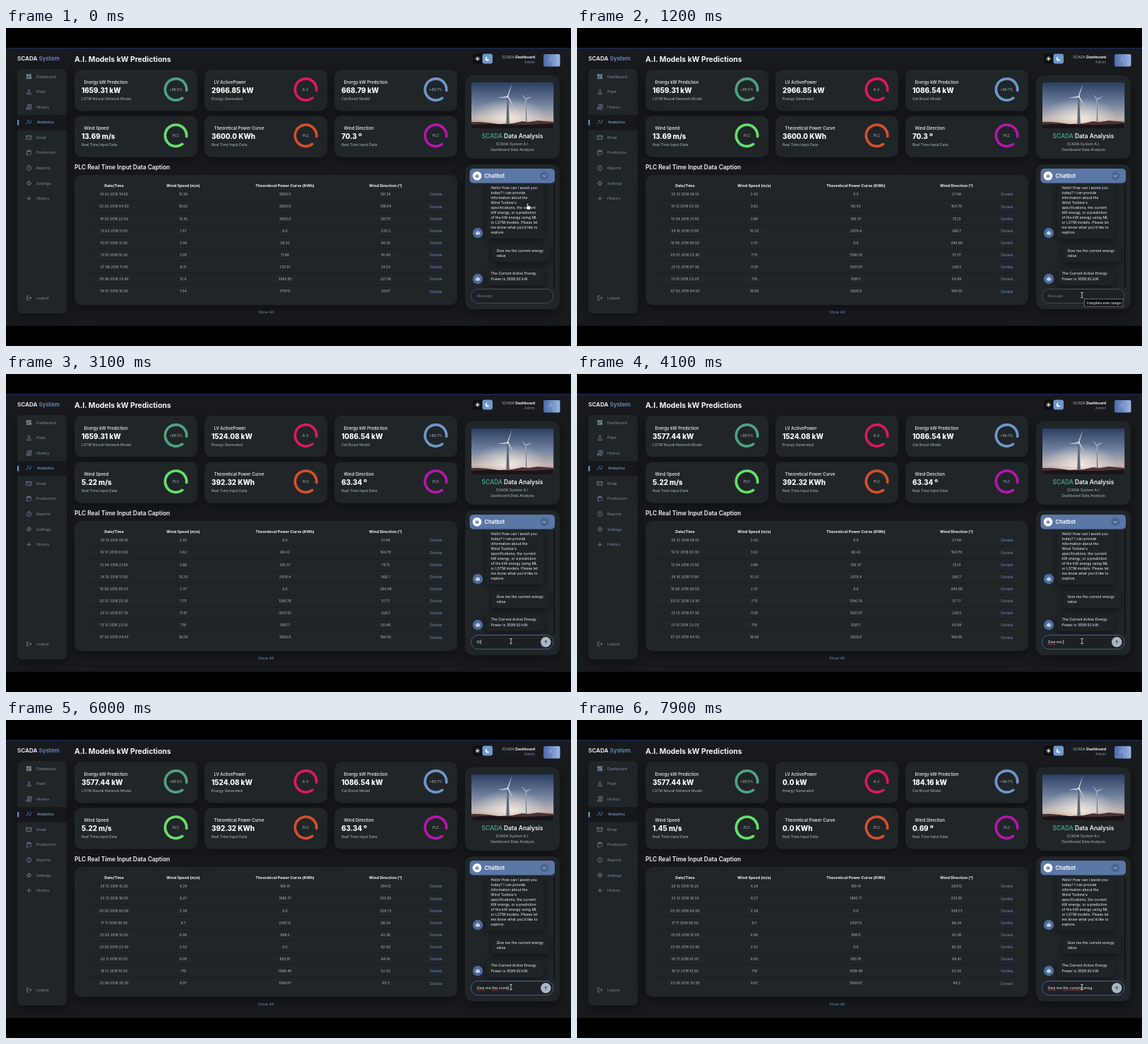
Animation of 800 by 450 pixels, one loop 8000 ms. Source, as an HTML page:

```html
<!DOCTYPE html>
<html lang="en">
<head>
<meta charset="utf-8">
<title>Plant dashboard</title>
<style>
html, body { margin: 0; width: 100%; height: 100%; overflow: hidden; background: #000; }
svg { display: block; width: 800px; height: 450px; }
text { font-family: Inter, "Open Sans", sans-serif; white-space: pre; }
.panel { fill: #202528; filter: drop-shadow(0 6px 8px rgba(0, 0, 0, .4)); }
.bubble { fill: #1e2326; filter: drop-shadow(0 3px 4px rgba(0, 0, 0, .45)); }
</style>
</head>
<body>
<svg id="stage" viewBox="0 0 800 450" xmlns="http://www.w3.org/2000/svg"></svg>
<script>
const LOOP = 8000;
const WHITE = '#f4f5fd', MUTED = '#b0bcc4', GREY = '#7d8da1', BLUE = '#6690c4';
const stage = document.getElementById('stage');

// Markup helpers; text is placed by the middle of its capitals.
const text = (x, mid, str, size, o = {}) =>
  `<text x="${x}" y="${(mid + size * .36).toFixed(2)}" font-size="${size}" font-weight="${o.weight || 400}"` +
  ` fill="${o.fill || MUTED}" text-anchor="${o.anchor || 'start'}"${o.id ? ` id="${o.id}"` : ''}>${str}</text>`;
const rect = (x, y, x2, y2, r, attrs) =>
  `<rect x="${x}" y="${y}" width="${x2 - x}" height="${y2 - y}" rx="${r}" ${attrs}/>`;
const circle = (x, y, r, attrs) => `<circle cx="${x}" cy="${y}" r="${r}" ${attrs}/>`;
const path = (d, attrs) => `<path d="${d}" ${attrs}/>`;
const line = (color, width) =>
  `fill="none" stroke="${color}" stroke-width="${width}" stroke-linecap="round" stroke-linejoin="round"`;
const mid = { anchor: 'middle' };

const MENU = [
  ['Dashboard', 'M4 4h6v8h-6zM4 16h6v4h-6zM14 4h6v4h-6zM14 12h6v8h-6z', true],
  ['Plant', 'M12 4a3.5 3.5 0 1 0 .1 0zM5 20v-2c0-5 14-5 14 0v2z'],
  ['History', 'M7 16V3h14v15a3 3 0 0 1-3 3H5a3 3 0 0 1-3-3v-2h13v3M11 8h6M11 12h6'],
  ['Analytics', 'M2 18l7-7 5 5 8-9M8 4v3M6.5 5.5h3M17 3v2M18 13v1'],
  ['Email', 'M3 5h18v14H3zM3 7l9 6 9-6'],
  ['Production', 'M10 21H4V5h16v6M9 3h6v5H9zM13 17l3 3 6-6'],
  ['Reports', 'M12 3a9 9 0 1 0 .1 0M12 7v6M12 16.5v.5'],
  ['Settings', 'M12 7a5 5 0 1 0 .1 0zM12 3v4M12 17v4M3 12h4M17 12h4M6 6l2 2M18 6l-2 2M6 18l2-2M18 18l-2-2'],
  ['History', 'M12 5v14M5 12h14']
];
const LOGOUT = 'M11 4H4v16h7M9 12h12M17 8l4 4-4 4';

const CARDS = [
  ['Energy kW Prediction', 'LSTM Neural Network Model', '+99.5%', '#4fa183'],
  ['LV ActivePower', 'Energy Generated', 'A.V.', '#dc195d'],
  ['Energy kW Prediction', 'Cat Boost Model', '+98.7%', '#7096c8'],
  ['Wind Speed', 'Real Time Input Data', 'PLC', '#66df6a'],
  ['Theoretical Power Curve', 'Real Time Input Data', 'PLC', '#d3502f'],
  ['Wind Direction', 'Real Time Input Data', 'PLC', '#b617a9']
];
// Card readings as [time, value] steps.
const VALUES = [
  [[0, '1659.31 kW'], [3500, '3577.44 kW']],
  [[0, '2966.85 kW'], [2400, '1524.08 kW'], [7400, '0.0 kW']],
  [[0, '668.79 kW'], [600, '1086.54 kW'], [6600, '184.16 kW']],
  [[0, '13.69 m/s'], [2400, '5.22 m/s'], [7400, '1.45 m/s']],
  [[0, '3600.0 KWh'], [2400, '392.32 KWh'], [7400, '0.0 KWh']],
  [[0, '70.3 º'], [2400, '63.34 º'], [7400, '0.69 º']]
];

const COLUMNS = [[153, 'Date/Time'], [251, 'Wind Speed (m/s)'],
  [395, 'Theoretical Power Curve (KWh)'], [537.5, 'Wind Direction (°)']];
const TABLES = [
  [0, `14 02 2018 14:00|15.38|3600.0|191.34
02 03 2018 04:30|16.02|3600.0|198.94
19 03 2018 22:50|13.35|3600.0|207.17
13 02 2018 11:00|1.57|0.0|235.3
10 07 2018 12:00|3.34|36.32|40.35
31 10 2018 18:20|3.05|17.68|45.49
27 08 2018 11:40|6.31|732.51|24.03
29 06 2018 23:40|12.6|3585.95|221.58
14 07 2018 16:00|7.34|1178.12|29.67`],
  [1100, `30 12 2018 09:10|2.42|0.0|27.49
16 12 2018 03:30|3.62|66.42|164.79
13 04 2018 21:00|3.88|105.37|75.13
24 10 2018 17:00|10.33|2979.4|266.7
10 06 2018 00:50|2.37|0.0|284.99
03 07 2018 23:30|7.75|1390.76|57.77
23 12 2018 07:30|11.91|3507.01|228.5
13 10 2018 23:20|7.16|1091.7|50.49
07 03 2018 04:50|18.08|3600.0|188.58`],
  [5000, `29 12 2018 15:20|4.24|169.41|284.12
23 12 2018 18:30|8.27|1685.71|255.05
05 05 2018 00:00|2.39|0.0|328.73
17 11 2018 06:50|9.7|2591.12|68.24
25 05 2018 10:00|6.96|998.0|42.36
23 05 2018 02:40|2.52|0.0|82.92
02 11 2018 01:20|6.09|655.91|68.41
18 12 2018 10:00|7.16|1088.48|52.42
23 06 2018 20:30|8.07|1568.67|49.3`]
];

const CHAT = ['Hello! How can I assist you', 'today? I can provide', 'information about the',
  "Wind Turbine's", 'specifications, the current', 'kW energy, or a prediction',
  'of the kW energy using ML', 'or LSTM models. Please let', "me know what you'd like to", 'explore.'];

const TYPED = 'Give me the current eneg';
// Moments at which each letter lands.
const KEYS = [2900, 3100, 3300, 3450, 3600, 3800, 3900, 4100, 4500, 4700, 4900, 5400,
  5500, 5600, 5800, 5900, 6000, 6200, 6300, 6400, 6600, 6800, 7100, 7300];
const FOCUS = 2300;

function sidebar() {
  const icon = (d, y, color, solid) => `<g transform="translate(28 ${y - 4.5}) scale(.375)">` +
    path(d, line(color, 2) + (solid ? ` style="fill:${color}"` : '')) + '</g>';
  let out = text(16, 43.5, `SCADA <tspan fill="${BLUE}">System</tspan>`, 8.1, { weight: 600, fill: WHITE });
  out += rect(16, 58, 86, 404, 7, 'class="panel"');
  out += rect(16, 123, 86, 144.5, 0, 'fill="#16181c"') + rect(16, 130, 18.2, 137.5, 0, `fill="${BLUE}"`);
  MENU.forEach(([name, d, solid], i) => {
    const y = 68.7 + i * 21.57, on = i === 3;
    out += icon(d, y, on ? BLUE : GREY, solid) +
      text(on ? 44 : 43, y, name, 5.4, { weight: on ? 500 : 400, fill: on ? '#7ea7da' : GREY });
  });
  return out + icon(LOGOUT, 382, GREY) + text(43, 382, 'Logout', 5.4, { fill: GREY });
}

function cards() {
  return CARDS.map(([title, note, badge, color], i) => {
    const x = 97 + i % 3 * 184, y = i < 3 ? 59 : 124.2;
    return rect(x, y, x + 174, y + 58.5, 10, 'class="panel"') +
      text(x + 13.5, y + 17.4, title, 6, { weight: 500, fill: WHITE }) +
      text(x + 10, y + 29.4, '', 9.8, { weight: 800, fill: '#fff', id: 'value' + i }) +
      text(x + 10, y + 41.3, note, 5.15) +
      `<g transform="translate(${x + 143.5} ${y + 28})">` +
      circle(0, 0, 15.2, line(color, 3.7) + ' pathLength="360" stroke-dasharray="312 48" transform="rotate(53)"') +
      text(0, 0, badge, 5, mid) + '</g>';
  }).join('');
}

function table() {
  let out = text(97, 197.2, 'PLC Real Time Input Data Caption', 8.4, { weight: 600, fill: WHITE }) +
    rect(97, 208, 639, 392, 10, 'class="panel"');
  COLUMNS.forEach(([x, name]) => out += text(x, 222.7, name, 5.4, { ...mid, weight: 700, fill: WHITE }));
  for (let r = 0; r < 9; r++) {
    const y = 235.5 + r * 17.14;
    COLUMNS.forEach(([x], c) => out += text(x, y, '', 4.95, { ...mid, id: `cell${r}_${c}` }));
    out += text(609, y, 'Details', 5.4, { ...mid, fill: BLUE });
    if (r < 8) out += rect(110, y + 8.3, 626, y + 8.8, 0, 'fill="#15181b"');
  }
  return out + text(368, 402, 'Show All', 5.4, { ...mid, fill: BLUE });
}

// A three-bladed rotor seen at an angle, so narrower than it is tall.
const rotor = (x, y, r, turn, fill) => `<g transform="translate(${x} ${y}) scale(.75 1)">` +
  [0, 120, 240].map(a => path(`M-.8 0L-1.2 ${-r * .25}L0 ${-r}L.8 0Z`,
    `fill="${fill}" transform="rotate(${turn + a})"`)).join('') + '</g>';

function header() {
  const ray = [0, 45, 90, 135, 180, 225, 270, 315].map(a =>
    path('M0-2.2v-.9', line('#fff', .7) + ` transform="rotate(${a})"`)).join('');
  return text(97, 44.3, 'A.I. Models kW Predictions', 10.4, { weight: 700, fill: WHITE }) +
    rect(661, 36.5, 689, 50.5, 3, 'fill="#0c0d10"') + rect(674.5, 36.5, 689, 50.5, 3, 'fill="#6f98cd"') +
    `<g transform="translate(667.7 43.5)">${circle(0, 0, 1.6, 'fill="#fff"')}${ray}</g>` +
    path('M681.5 40.4a3.1 3.1 0 1 0 3.4 3.8a2.3 2.3 0 0 1-3.4-3.8z', 'fill="#fff"') +
    text(749, 41, `SCADA <tspan font-weight="700" fill="${WHITE}">Dashboard</tspan>`, 5.2, { anchor: 'end' }) +
    text(749, 48.2, 'Admin', 5, { anchor: 'end', fill: GREY }) +
    rect(761, 37, 784.5, 54.5, 2, 'fill="url(#thumb)"') +
    path('M771.2 44.5l-.4 10h1z', 'fill="#4a62a0"') + rotor(771.3, 44.5, 6, 20, '#89a3d6');
}

function profile() {
  return rect(650, 67, 784, 185, 11, 'class="panel"') + '<g clip-path="url(#photo)">' +
    rect(659, 77, 775.5, 142, 0, 'fill="url(#sky)"') + rect(659, 77, 775.5, 142, 0, 'fill="url(#glow)"') +
    path('M659 133l12 0 12 1 14 2 20-1 14-3 9 1 13-2 22 2v9H659z', 'fill="#4a3236"') +
    path('M659 137q25-2 50-.5t67-1.500v8H659z', 'fill="#191417"') +
    path('M736.5 101l-.6 31h1.4z', 'fill="#626b7d"') + rotor(736.5, 101, 12, 70, '#aab1c0') +
    path('M709.7 97l-1.5 39h4.6l-1.600-39z', 'fill="#5d6575"') +
    rotor(710.5, 97, 20, 24, '#cfd5df') + circle(710.5, 97, 1.4, 'fill="#e2e5ea"') + '</g>' +
    text(717, 153, `<tspan fill="#4a9f81">SCADA</tspan> Data Analysis`, 8.4, { ...mid, weight: 600, fill: WHITE }) +
    text(717, 164.2, 'SCADA System A.I.', 5.2, mid) + text(717, 171.7, 'Dashboard Data Analysis', 5.2, mid);
}

const robot = (x, y, r, back, front) => circle(x, y, r, `fill="${back}"`) +
  rect(x - r * .42, y - r * .25, x + r * .42, y + r * .35, r * .25, `fill="${front}"`) +
  path(`M${x} ${y - r * .25}v${-r * .2}`, line(front, .6)) +
  circle(x - r * .18, y, r * .1, `fill="${back}"`) + circle(x + r * .18, y, r * .1, `fill="${back}"`);

function chat() {
  const say = (x, y, str) => text(x, y, str, 5.15, { fill: WHITE });
  return rect(650, 193, 784, 398, 11, 'class="panel"') +
    rect(656.5, 199, 777, 219.5, 5, 'fill="#5b77a6"') + robot(667, 209.2, 6.3, '#fff', '#5b77a6') +
    text(677.5, 209.3, 'Chatbot', 7.4, { weight: 600, fill: '#fff' }) +
    circle(762.3, 209.2, 6, 'fill="#4b648f"') + path('M760.3 208.5l2 2 2-2', line('#fff', .8)) +
    '<g clip-path="url(#log)">' +
    rect(679.5, 215, 761, 298, 4, 'class="bubble"') + CHAT.map((s, i) => say(686.5, 226 + i * 7.05, s)).join('') +
    robot(668, 290, 7.2, '#4d6b9c', '#e6ecf6') +
    rect(687.5, 307, 770, 331, 4, 'class="bubble"') +
    say(694.5, 315.2, 'Give me the current energy') + say(694.5, 322.2, 'value') +
    rect(679.5, 339.5, 761, 364, 4, 'class="bubble"') +
    say(686.5, 347.6, 'The Current Active Energy') + say(686.5, 354.7, 'Power is 3599.92 kW.') +
    robot(668, 355, 7.2, '#4d6b9c', '#e6ecf6') +
    '</g>' + rect(775, 222, 777, 368, 1, 'fill="#121417"') +
    rect(658.5, 369.5, 775, 389.3, 9.9, 'id="field" fill="#1d2124"') +
    text(666.5, 379.3, 'Message..', 5, { fill: '#6f7b83', id: 'hint' }) +
    text(666.5, 379.3, '', 5.25, { fill: WHITE, id: 'entry' }) +
    path('', line('#b8434a', .6) + ' id="squiggle"') + path('', line('#fff', .6) + ' id="caret"') +
    '<g id="send">' + circle(764.3, 379.3, 7.2, 'fill="#aab8c4"') +
    path('M764.3 381.5v-4.2M762.5 379l1.8-1.8 1.8 1.8', line('#26303c', .8)) + '</g>' +
    '<g id="tip">' + rect(718.5, 383.5, 773, 394, 0, 'fill="#0b0c0e" stroke="#8a8f94" stroke-width=".7"') +
    '<text x="721.5" y="390.6" font-size="4.9" fill="#fff" style="font-family:\'Noto Serif\',serif">Completa este campo</text></g>';
}

const pointers =
  `<g id="hand">${path('M-1.2-4.5q.8-.9 1.5 0v3l3 .8q.9.3.7 1.4l-.7 3.3h-4l-2.5-3.4q.1-1.3 2 .1z',
    'fill="#fff" stroke="#111" stroke-width=".5"')}</g>` +
  `<g id="beam">${path('M-1.3-3.5h2.6M0-3.5v7M-1.3 3.5h2.6', line('#dfe4e8', .8))}</g>`;

stage.innerHTML = `<defs>
<linearGradient id="sky" x2="0" y2="1"><stop stop-color="#2b3f62"/><stop offset=".45" stop-color="#6d7f9c"/><stop offset=".8" stop-color="#c0b6b4"/><stop offset=".9" stop-color="#b98f80"/></linearGradient>
<radialGradient id="glow" cx=".46" cy=".78" r=".45"><stop stop-color="#fff6ea" stop-opacity=".8"/><stop offset="1" stop-color="#fff6ea" stop-opacity="0"/></radialGradient>
<linearGradient id="thumb" x2="1"><stop stop-color="#4c69a9"/><stop offset="1" stop-color="#9cb6e0"/></linearGradient>
<clipPath id="photo">${rect(659, 77, 775.5, 142, 2, '')}</clipPath>
<clipPath id="log">${rect(652, 221.5, 777, 368, 0, '')}</clipPath></defs>` +
  rect(0, 0, 800, 450, 0, 'fill="#000"') + rect(0, 28, 800, 421.5, 0, 'fill="#181a1e"') +
  rect(0, 28, 800, 29.2, 0, 'fill="#1c2a58"') +
  sidebar() + header() + cards() + table() + profile() + chat() + pointers;

const $ = id => document.getElementById(id);
const show = (id, on) => $(id).setAttribute('visibility', on ? 'visible' : 'hidden');
const move = (id, x, y) => $(id).setAttribute('transform', `translate(${x} ${y})`);
const put = (id, str) => { const el = $(id); if (el.textContent !== str) el.textContent = str; };
const at = (steps, t) => steps.filter(s => s[0] <= t).pop()[1];
const ease = p => p * p * (3 - 2 * p);

function drawEntry(t) {
  const count = KEYS.filter(k => k <= t).length;
  const entry = $('entry'), focused = t >= FOCUS;
  put('entry', TYPED.slice(0, count));
  show('hint', !count);
  show('send', count > 0);
  show('tip', t >= 1100 && t < FOCUS);
  $('field').setAttribute('stroke', focused ? '#45638c' : '#4b5a76');
  $('field').setAttribute('stroke-width', focused ? 1 : .8);

  const reach = n => 666.5 + (n ? entry.getSubStringLength(0, n) : 0);
  const last = count ? KEYS[count - 1] : FOCUS;
  show('caret', focused && Math.floor((t - last) / 500) % 2 === 0);
  $('caret').setAttribute('d', `M${reach(count) + .5} 376.5v5.6`);

  // Words are flagged once the next key follows them.
  const marks = [[0, 4], [8, 11], [12, 19]].filter(w => count > w[1]);
  $('squiggle').setAttribute('d', marks.map(w => `M${reach(w[0])} 382.6H${reach(w[1])}`).join(''));
}

function render(t) {
  VALUES.forEach((steps, i) => put('value' + i, at(steps, t)));
  at(TABLES, t).split('\n').forEach((row, r) =>
    row.split('|').forEach((cell, c) => put(`cell${r}_${c}`, cell)));

  const p = ease(Math.min(1, Math.max(0, (t - 200) / 700)));
  const x = 739 - 24 * p, y = 253 + 125 * p, inField = y > 369;
  show('hand', !inField);
  show('beam', inField);
  move('hand', x, y);
  move('beam', x, y);
  drawEntry(t);
}

const start = performance.now();
function tick() {
  render((performance.now() - start) % LOOP);
  requestAnimationFrame(tick);
}
tick();
</script>
</body>
</html>
```
